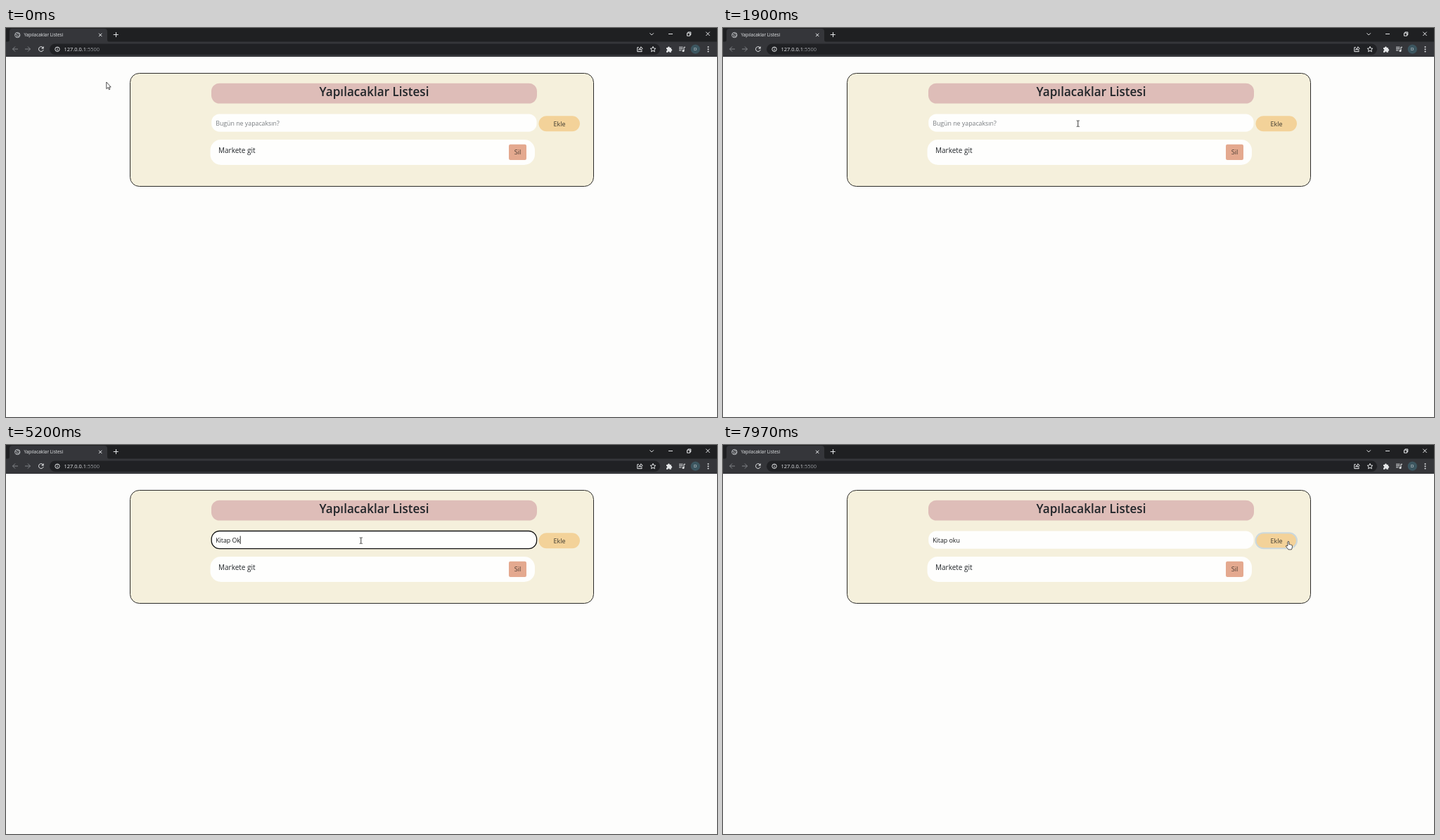
An HTML page that plays this animation: 1011x554 px, repeating every 8000 ms.

```html
<!DOCTYPE html>
<html lang="tr">
<head>
<meta charset="utf-8">
<title>Yapılacaklar Listesi</title>
<style>
  html, body { margin: 0; width: 100%; height: 100%; overflow: hidden; background: #fdfdfc; }
  svg { display: block; font-family: "Open Sans", "Noto Sans", sans-serif; }
  text { white-space: pre; }
  .line { fill: none; stroke: #e4e6e8; stroke-width: 1; }
  .dim { stroke: #818488; }
  .white { fill: #e4e6e8; }
  .mid { text-anchor: middle; }
</style>
</head>
<body>
<svg width="1011" height="554" viewBox="0 0 1011 554">
  <rect width="1011" height="554" fill="#fdfdfc"/>

  <!-- browser bar -->
  <rect width="1011" height="20" fill="#1f2022"/>
  <rect y="19.5" width="1011" height="21.5" fill="#35363a"/>
  <path d="M2 20Q5 20 5 16V5Q5 1 9 1H140Q144 1 144 5V16Q144 20 147 20Z" fill="#35363a"/>
  <g class="line" style="stroke:#b4b7ba">
    <circle cx="16.3" cy="10" r="3.7"/>
    <path d="M13 8.5L16 10.3L15.5 13M15 6.6L17 8.3L19.8 8.6M17.5 13L18 10.8L20 10.6"/>
  </g>
  <text x="25.5" y="12.3" font-size="6.45" fill="#e4e6e8">Yapılacaklar Listesi</text>
  <path class="line" d="M132 7.7l4.4 4.4m0-4.4l-4.4 4.4M152.7 9.5h7M156.5 6v7"/>
  <path class="line" d="M915.5 7.3l2.7 2.7l2.7-2.7M942 8.5h6M995.3 5.6l5.4 5.4m0-5.4l-5.4 5.4"/>
  <path class="line" d="M968.5 7.2h4v4h-4zM969.8 7V5.9h4v4h-1"/>

  <path class="line dim" d="M17 30H9.5M13 26.5L9.5 30L13 33.5M27 30h7.5M31 26.5l3.5 3.5l-3.5 3.5"/>
  <path class="line" d="M52.4 27.7a3.4 3.4 0 1 0 .8 3.2"/>
  <path class="white" d="M53.6 26v3.5h-3.5z"/>
  <rect x="62" y="22.5" width="868" height="15.5" rx="7.75" fill="#202124"/>
  <circle class="line" cx="73" cy="30.2" r="3.2" stroke-width=".8"/>
  <path class="line" d="M73 29.7v2.2M73 28.1v.9"/>
  <text x="82.5" y="33" font-size="7.45" fill="#e8eaed">127.0.0.1<tspan fill="#96999d">:5500</tspan></text>
  <path class="line" stroke-width=".9" d="M899.8 27.6h-2v6h6.3v-1.8M899.8 31.4q.3-3 3-3.1v-1.6l2.4 2.5l-2.4 2.5v-1.6q-2 0-3 1.3z"/>
  <path class="line" stroke-width=".9" d="M920 26.4l1.1 2.5l2.7.3l-2 1.8l.6 2.7l-2.4-1.4l-2.4 1.4l.6-2.7l-2-1.8l2.7-.3z"/>
  <path class="white" d="M939 28h2a1.4 1.4 0 0 1 2.8 0h2v2a1.4 1.4 0 0 1 0 2.8v2h-2.2a1.2 1.2 0 0 0-2.4 0H939v-2.3a1.2 1.2 0 0 0 0-2.4z"/>
  <path class="line" d="M957 27.3h5.5M957 29.6h5.5M957 31.9h3.5M964 32.5v-5.2h2"/>
  <circle class="white" cx="963" cy="32.6" r="1.5"/>
  <circle cx="980.3" cy="30.2" r="6.6" fill="#3c5660"/>
  <text class="mid" x="980.3" y="32.4" font-size="6" fill="#e4e6e8">D</text>
  <g class="white">
    <circle cx="998.5" cy="27" r="1"/><circle cx="998.5" cy="30.2" r="1"/><circle cx="998.5" cy="33.4" r="1"/>
  </g>

  <!-- to-do card -->
  <rect x="176.5" y="64.5" width="659" height="161" rx="13" fill="#f5f0dc" stroke="#2b2b29"/>
  <rect x="292" y="78.7" width="463" height="28.8" rx="11.5" fill="#debdb8"/>
  <text class="mid" x="523.5" y="97" font-size="17.1" font-weight="600" fill="#212529">Yapılacaklar Listesi</text>
  <rect id="field" x="292.2" y="122.5" width="462.4" height="25.2" rx="11.5" fill="#fefefd"/>
  <text id="entry" x="298.2" y="138.6" font-size="8.8"></text>
  <path id="caret" stroke="#111" stroke-width=".9"/>
  <rect id="add" x="757.5" y="125.3" width="58.5" height="21.9" rx="10.9" fill="#f3d299"/>
  <text class="mid" x="787" y="139.6" font-size="9" fill="#3c382f">Ekle</text>
  <rect x="290.5" y="159" width="461.5" height="36" rx="15" fill="#fefefd"/>
  <text x="302" y="177.5" font-size="10" fill="#212529">Markete git</text>
  <rect x="715" y="165.8" width="25" height="22.2" rx="2.2" fill="#e4a98f"/>
  <text class="mid" x="727.5" y="180.3" font-size="9.2" fill="#4a3a32">Sil</text>

  <!-- mouse pointers, hot spot at 0,0 -->
  <g id="mouse">
    <path id="arrow" d="M0 0V9.6L2.2 7.6L3.7 10.8L5.1 10.1L3.7 7.1H6.4Z" fill="#fff" stroke="#222" stroke-width=".8"/>
    <path id="beam" d="M-2-4H-.6L0-3.5L.6-4H2M0-3.5V3.8M-2 4.3H-.6L0 3.8L.6 4.3H2" fill="none" stroke="#222" stroke-width=".9"/>
    <path id="hand" d="M-1 7V1Q0-.6 1 1V4.8Q2 4 2.7 5.1Q3.7 4.5 4.3 5.6Q5.5 5.2 5.5 6.6V8.6Q5.3 10.2 4.5 12H0Q-2 9.4-3.6 7.2Q-3.4 5.4-1 7Z" transform="translate(-.6 .6)" fill="#fff" stroke="#222" stroke-width=".8"/>
  </g>
</svg>
<script>
const LOOP = 8000, BLINK = 530, FOCUS = 2300, CLICK = 7600;
const $ = id => document.getElementById(id);

// time, x, y
const path = [
  [0, 142.8, 77], [150, 142.8, 77], [900, 812, 215], [1260, 812.3, 218.5],
  [1400, 812.3, 218.5], [1850, 504.8, 136], [6550, 504.8, 136], [7250, 804.5, 136.3], [LOOP, 804.5, 136.3]
];
// time, text in the field
const typing = [
  [FOCUS, ""], [3430, "K"], [3620, "Ki"], [3980, "Kit"], [4180, "Kita"], [4370, "Kitap"],
  [4620, "Kitap "], [4900, "Kitap O"], [5090, "Kitap Ok"], [5480, "Kitap O"], [5640, "Kitap "],
  [5830, "Kitap o"], [5990, "Kitap ok"], [6160, "Kitap oku"]
];

function mouseAt(t) {
  const i = path.findIndex(p => p[0] > t);
  const [t0, x0, y0] = path[i - 1], [t1, x1, y1] = path[i];
  const u = (t - t0) / (t1 - t0), e = u * u * (3 - 2 * u);
  return [x0 + (x1 - x0) * e, y0 + (y1 - y0) * e];
}

function show(id, on) { $(id).style.display = on ? "" : "none"; }

function outline(id, color, width) {
  $(id).setAttribute("stroke", color);
  $(id).setAttribute("stroke-width", width);
}

function inside(id, x, y) {
  const b = $(id).getBBox();
  return x > b.x && x < b.x + b.width && y > b.y && y < b.y + b.height;
}

function draw(t) {
  const [x, y] = mouseAt(t);
  const kind = inside("field", x, y) ? "beam" : inside("add", x, y) ? "hand" : "arrow";
  $("mouse").setAttribute("transform", `translate(${x} ${y})`);
  for (const id of ["arrow", "beam", "hand"]) show(id, id === kind);

  const [since, text] = typing.filter(k => k[0] <= t).pop() || [0, ""];
  const entry = $("entry"), focused = t >= FOCUS && t < CLICK;
  entry.textContent = text || "Bugün ne yapacaksın?";
  entry.setAttribute("fill", text ? "#16181a" : "#777b7f");

  const caretX = 298.4 + (text ? entry.getComputedTextLength() : 0);
  $("caret").setAttribute("d", `M${caretX} 129.5V141`);
  show("caret", focused && (t - since) % (2 * BLINK) < BLINK);

  outline("field", focused ? "#111" : "none", 1.3);
  outline("add", t >= CLICK ? "#cbd8dc" : "none", 2);
}

const start = performance.now();
function tick() {
  draw((performance.now() - start) % LOOP);
  requestAnimationFrame(tick);
}
tick();
</script>
</body>
</html>
```
